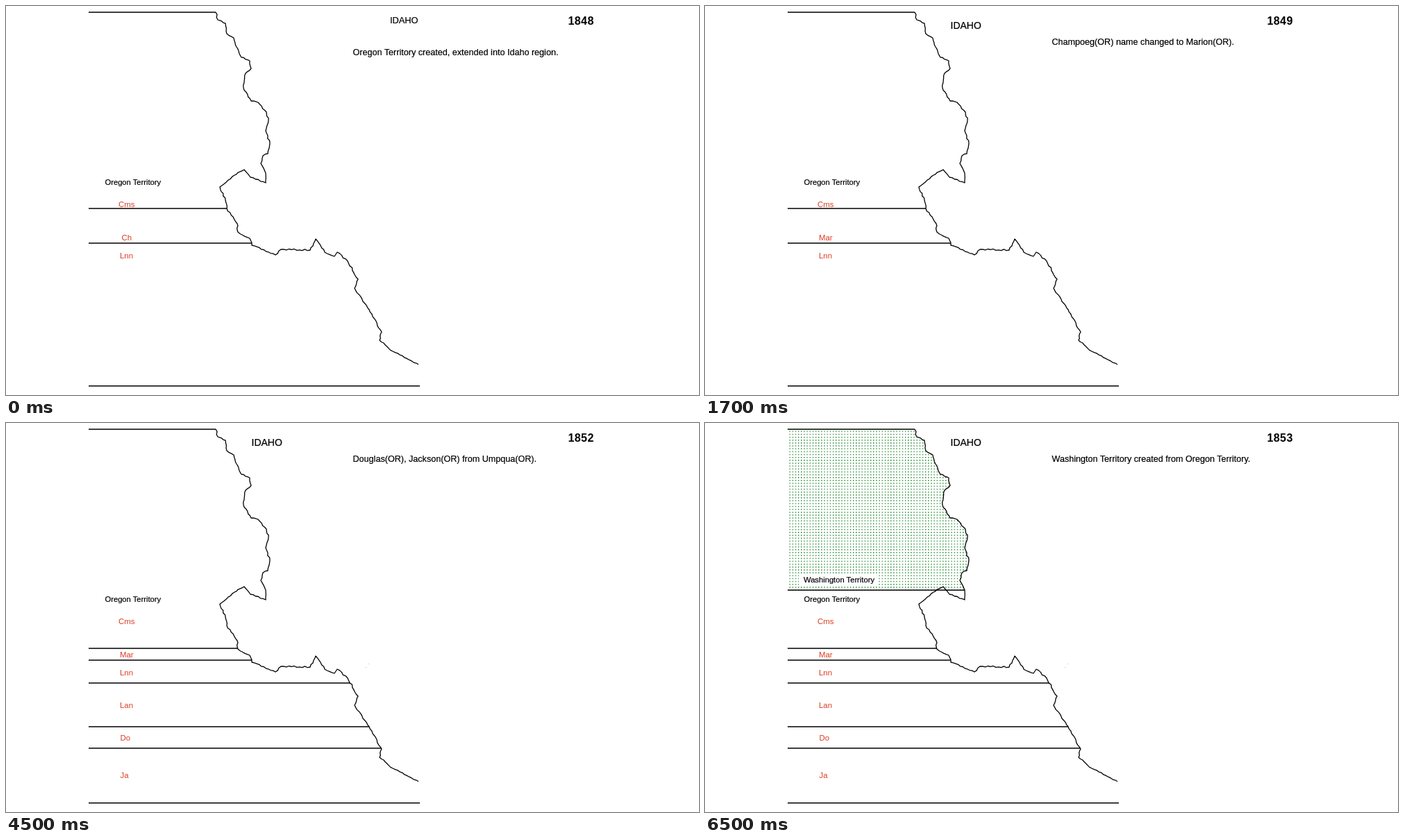
Write an HTML page that moves like this. It is 998 px wide and 561 px high and loops after 8 s.

```html
<!DOCTYPE html>
<html lang="en">
<head>
<meta charset="utf-8">
<title>Idaho region, 1848–1853</title>
<style>
  html, body { margin: 0; width: 100%; height: 100%; overflow: hidden; background: #fff; }
  svg { display: block; width: 100%; height: 100%; }
  text { font: 12.6px "Liberation Sans", Arial, sans-serif; stroke: #000; stroke-width: .2; }
  .place { font-size: 11.2px; }
  .county { font-size: 11.4px; fill: #dc3c22; stroke: none; }
  #year { font-size: 16px; font-weight: bold; letter-spacing: .4px; stroke: none; }
  .line { fill: none; stroke: #000; stroke-width: 1.3; stroke-linejoin: round; }
  #borders { stroke-width: 1.5; }
</style>
</head>
<body>
<svg viewBox="0 0 998 561">
  <defs>
    <pattern id="dots" x="121.5" y="11.5" width="4.16" height="4.16" patternUnits="userSpaceOnUse">
      <rect width="1.4" height="1.4" fill="#178426"/>
    </pattern>
    <clipPath id="land"><path id="area"/></clipPath>
  </defs>
  <g id="washington">
    <rect x="119" y="9" width="270" height="232" fill="url(#dots)" clip-path="url(#land)"/>
    <rect x="135" y="217" width="114" height="19" fill="#fff"/>
    <text class="place" x="142" y="230">Washington Territory</text>
  </g>
  <path id="coast" class="line"/>
  <path id="borders" class="line"/>
  <path id="specks" d="M522,347h1v1h-1zM518,352h1v1h-1z" fill="#bbb"/>
  <text class="place" x="142.5" y="258">Oregon Territory</text>
  <g id="counties"></g>
  <text id="title">IDAHO</text>
  <text id="year" x="809.5" y="27"></text>
  <text id="note" x="499.5"></text>
</svg>
<script>
const $ = id => document.getElementById(id);

// Main bends of the river boundary, north to south
const bends = `302,9 305,20 316,25 318,40 328,46 332,59 339,74 351,79 353,90 345,97 342,118
  353,137 363,139 375,153 378,165 374,180 380,198 377,213 370,216 367,227 374,241 374,255
  352,247 343,236 329,244 308,261 316,280 318,292 333,314 334,326 351,335 354,345 388,359
  396,351 438,352 446,336 459,355 473,361 477,355 492,368 507,394 502,407 523,438 541,470
  538,482 557,498 594,517`.trim().split(/\s+/).map(p => p.split(",").map(Number));

let seed = 7;
const random = () => (seed = seed * 16807 % 2147483647) / 2147483647;

// Splits each stretch into short steps, pushed a little sideways
const coast = bends.slice(0, -1).flatMap(([x, y], i) => {
  const dx = bends[i + 1][0] - x, dy = bends[i + 1][1] - y;
  const length = Math.hypot(dx, dy), steps = Math.ceil(length / 4);
  return Array.from({ length: steps }, (_, k) => {
    const push = k ? (random() - .5) * 2 / length : 0;
    return [x + dx * k / steps - dy * push, y + dy * k / steps + dx * push];
  });
}).concat([bends.at(-1)]);

$("coast").setAttribute("d", `M${coast.join(" ")}`);
$("area").setAttribute("d", `M119,9 ${coast.join(" ")} 119,548Z`);

// A border runs east until it first meets the river
function border(y) {
  const i = coast.findIndex((p, k) => k + 1 < coast.length && p[1] <= y && coast[k + 1][1] > y);
  if (i < 0) return `M119,${y}H596`;
  const [[x0, y0], [x1, y1]] = coast.slice(i, i + 2);
  return `M119,${y}H${x0 + (x1 - x0) * (y - y0) / (y1 - y0)}`;
}

const spots = { Cms: [162, 290], Ch: [166.5, 338], Mar: [164, 338], Lnn: [164, 364],
  Lan: [164, 411], Um: [161.5, 494], Do: [164.5, 458], Ja: [164.5, 512] };

const early = [9, 292, 342, 548];
const later = [9, 325, 342, 375, 438, 548];
const final = ["Cms", "Mar", "Lnn", "Lan", "Do", "Ja"];
const scenes = [
  { at: 0, year: 1848, note: "Oregon Territory created, extended into Idaho region.",
    lines: early, names: ["Cms", "Ch", "Lnn"] },
  { at: 500, year: 1849, note: "Champoeg(OR) name changed to Marion(OR).",
    lines: early, names: ["Cms", "Mar", "Lnn"] },
  { at: 2500, year: 1851, note: "Lane(OR), Umpqua(OR) from Linn(OR).",
    lines: later, names: ["Cms", "Mar", "Lnn", "Lan", "Um"] },
  { at: 4500, year: 1852, note: "Douglas(OR), Jackson(OR) from Umpqua(OR).",
    lines: [...later, 469], names: final },
  { at: 6500, year: 1853, note: "Washington Territory created from Oregon Territory.",
    lines: [...later, 469, 241], names: final }
];

function show({ year, note, lines, names }) {
  const first = year === 1848;
  $("year").textContent = year;
  $("note").textContent = note;
  $("note").setAttribute("y", first ? 71 : 55.5);
  $("title").setAttribute("x", first ? 553 : 353.5);
  $("title").setAttribute("y", first ? 24.5 : 33);
  $("title").style.fontSize = first ? "12.8px" : "14px";
  $("borders").setAttribute("d", lines.map(border).join(""));
  $("counties").innerHTML = names.map(name =>
    `<text class="county" x="${spots[name][0]}" y="${spots[name][1]}">${name}</text>`).join("");
  $("washington").style.display = year === 1853 ? "" : "none";
  $("specks").style.display = year > 1849 ? "" : "none";
}

let current;
const start = performance.now();
function tick(now) {
  const t = Math.max(0, now - start) % 8000;
  const scene = scenes.findLast(s => s.at <= t);
  if (scene !== current) show(current = scene);
  requestAnimationFrame(tick);
}
tick(start);
</script>
</body>
</html>
```
